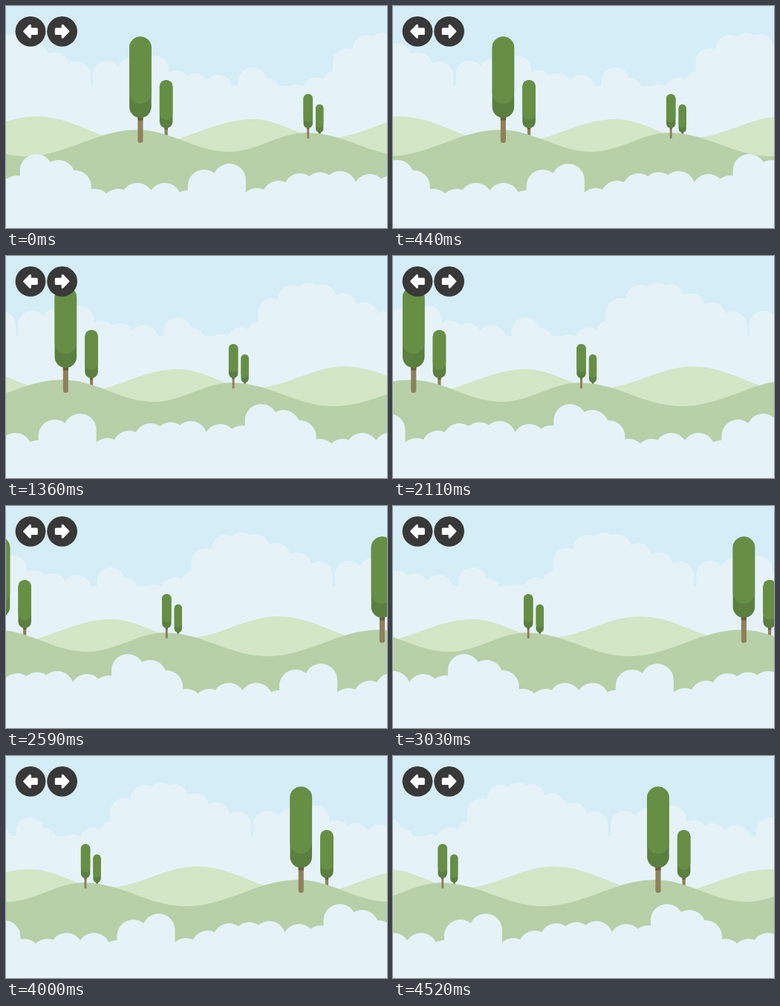
Animation, 513 px wide and 300 px high, one loop 4550 ms. Source, as an HTML page with a canvas:

```html
<!DOCTYPE html>
<html lang="en">
<head>
<meta charset="utf-8">
<title>Rolling hills</title>
<style>
  html, body { margin: 0; width: 100%; height: 100%; overflow: hidden; background: #d5edf7; }
  canvas { display: block; }
</style>
</head>
<body>
<canvas id="stage" width="513" height="300"></canvas>
<script>
const W = 513, H = 300, LOOP = 4550;
const ctx = document.getElementById('stage').getContext('2d');

const color = {
  sky: '#d5edf7', cloud: '#e5f3f9', farHill: '#d3e6c6', nearHill: '#b7d0a7',
  leaf: '#668f45', leafShade: '#5a7f3e', trunk: '#90805a', trunkShade: '#6d5c3c',
  button: '#383838'
};

// The land scrolls steadily with a short slowdown: [ms, px]
const scroll = [[0, 0], [1640, 121.3], [2110, 153.2], [LOOP, 342.3]];

// Key points [x, top] along each repeating outline
const sky = {
  width: 516, base: 108, radius: 19,
  keys: [[390, 106], [445, 87], [459, 57], [486, 39], [508, 36], [526, 38], [611, 75],
    [652, 74], [716, 67], [745, 87], [770, 91], [802, 93], [848, 83], [866, 97]]
};
const mist = {
  width: 504, base: 256, radius: 22,
  keys: [[15, 229], [41, 200], [71, 208], [93, 222], [120, 247], [151, 247], [177, 239],
    [214, 239], [244, 249], [267, 221], [301, 213], [338, 246], [396, 226], [450, 223], [490, 227]]
};
const farHill = { width: 516, keys: [[41, 149.3], [186, 187], [333, 153], [432, 178.5]] };
const nearHill = { width: 516, keys: [[26, 203], [177, 167.3], [300, 197], [405, 171.3]] };

// Trees: [centre x, crown top, crown height]
const frontTrees = [[181, 41.5, 109.5], [406.8, 119, 46]];
const rearTrees = [[215.7, 100, 65], [422.3, 133, 38]];

const mix = (a, b, t) => a + (b - a) * t;
const easeSine = t => (1 - Math.cos(Math.PI * t)) / 2;

function scrollAt(t) {
  const i = scroll.findIndex(([ms]) => ms > t);
  const [t0, d0] = scroll[i - 1], [t1, d1] = scroll[i];
  return mix(d0, d1, (t - t0) / (t1 - t0));
}

// Visits each pair of neighbouring keys over every tile that can be seen.
function eachSpan({ keys, width }, distance, visit) {
  for (let k = -2; k <= 2; k++) {
    const shift = k * width - distance % width;
    keys.forEach(([x, y], i) => {
      const [nextX, nextY] = keys[i + 1] || [keys[0][0] + width, keys[0][1]];
      visit(x + shift, y, nextX + shift, nextY);
    });
  }
}

// Round puffs on the keys, with more spread evenly over wide gaps.
function drawClouds(layer, distance) {
  const r = layer.radius;
  ctx.fillStyle = color.cloud;
  ctx.beginPath();
  ctx.rect(0, layer.base, W, H);
  eachSpan(layer, distance, (x0, y0, x1, y1) => {
    const count = Math.max(1, Math.round((x1 - x0) / 32));
    for (let i = 0; i < count; i++) {
      const x = mix(x0, x1, i / count), y = mix(y0, y1, i / count) + r;
      ctx.moveTo(x - r, y);
      ctx.arc(x, y, r, Math.PI, 0);
      ctx.lineTo(x + r, H);
      ctx.lineTo(x - r, H);
      ctx.closePath();
    }
  });
  ctx.fill();
}

// Sine easing between peaks and valleys
function drawHill(hill, distance, fill) {
  ctx.fillStyle = fill;
  ctx.beginPath();
  ctx.moveTo(-2 * W, H);
  eachSpan(hill, distance, (x0, y0, x1, y1) => {
    for (let t = 0; t < 1; t += 1 / 32) ctx.lineTo(mix(x0, x1, t), mix(y0, y1, easeSine(t)));
  });
  ctx.lineTo(3 * W, H);
  ctx.fill();
}

function capsule(x, top, bottom, width, fill) {
  ctx.fillStyle = fill;
  ctx.beginPath();
  ctx.roundRect(x - width / 2, top, width, bottom - top, width / 2);
  ctx.fill();
}

function drawTree(x, top, height) {
  const width = height * 0.27, trunk = width * 0.24, bottom = top + height;
  capsule(x, bottom - width / 2, bottom + height * 0.31, trunk, color.trunk);
  ctx.fillStyle = color.trunkShade;
  ctx.fillRect(x - trunk / 2, bottom - 2, trunk, 2 + width * 0.12);
  capsule(x, top, bottom, width, color.leafShade);
  capsule(x, top, bottom - width * 0.64, width, color.leaf);
}

function drawTrees(trees, distance) {
  for (const [x, top, height] of trees) {
    for (const lap of [0, sky.width]) drawTree(x - distance + lap, top, height);
  }
}

function drawButton(x, direction) {
  ctx.save();
  ctx.translate(x, 34.3);
  ctx.fillStyle = color.button;
  ctx.beginPath();
  ctx.arc(0, 0, 20.4, 0, Math.PI * 2);
  ctx.fill();
  ctx.scale(direction, 1);
  ctx.fillStyle = ctx.strokeStyle = '#fff';
  ctx.lineWidth = 3;
  ctx.lineJoin = 'round';
  ctx.beginPath();
  ctx.moveTo(8.3, 0);
  for (const side of [-1, 1]) {
    const half = [[0.6, 7.9], [0.6, 3.2], [-8.3, 3.2]];
    if (side > 0) half.reverse();
    for (const [px, py] of half) ctx.lineTo(px, py * side);
  }
  ctx.closePath();
  ctx.fill();
  ctx.stroke();
  ctx.restore();
}

function render(t) {
  const distance = scrollAt(t);
  ctx.fillStyle = color.sky;
  ctx.fillRect(0, 0, W, H);
  drawClouds(sky, distance);
  drawHill(farHill, distance, color.farHill);
  drawTrees(rearTrees, distance);
  drawHill(nearHill, distance, color.nearHill);
  drawTrees(frontTrees, distance);
  drawClouds(mist, distance * 2);
  drawButton(33, -1);
  drawButton(75.6, 1);
}

const began = performance.now();
function tick() {
  render((performance.now() - began) % LOOP);
  requestAnimationFrame(tick);
}
tick();
</script>
</body>
</html>
```
